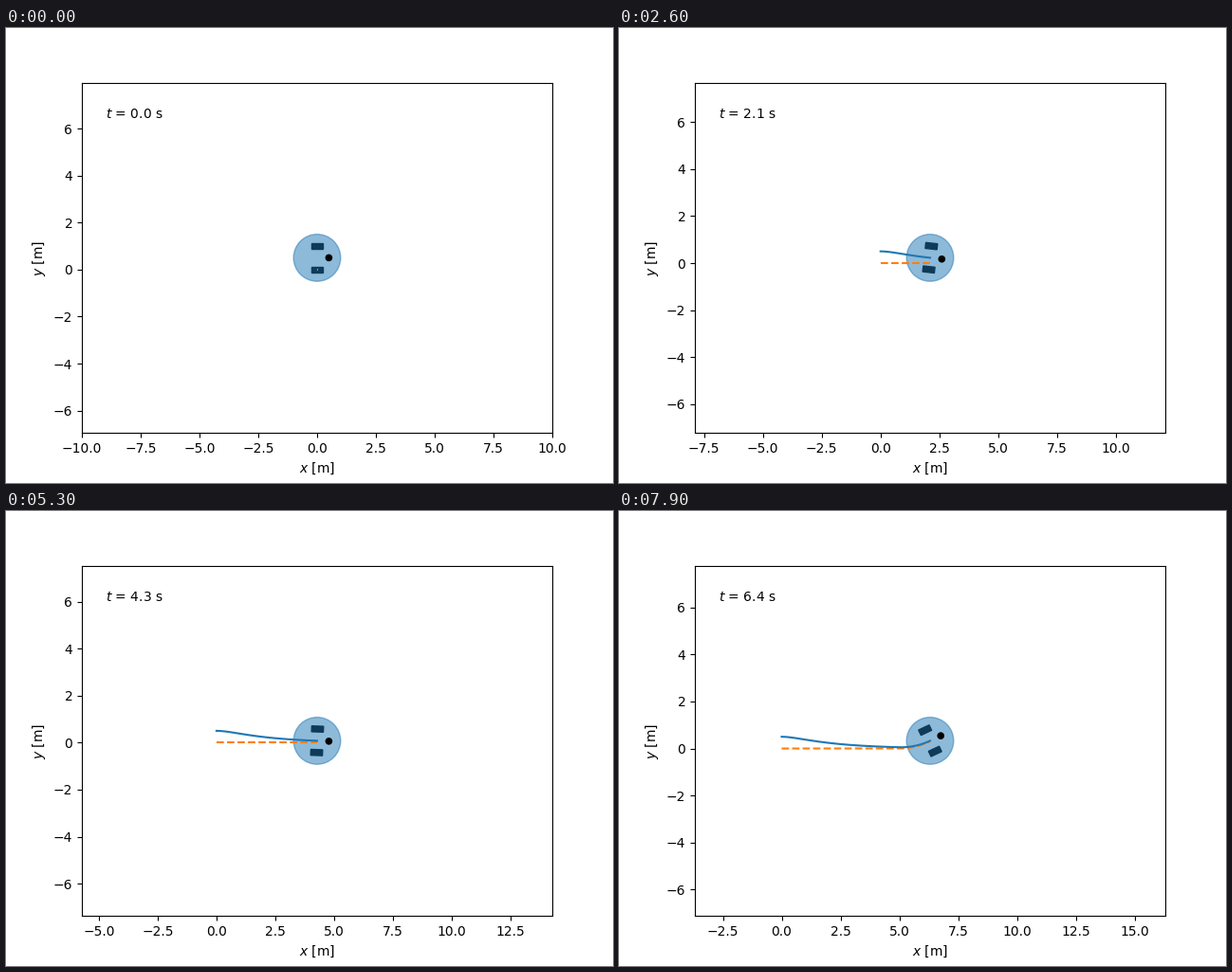
Write a matplotlib script that moves like this. It is 640 by 480 pixels and loops after 8 s.

```python
import numpy as np
import matplotlib.pyplot as plt
from matplotlib.animation import FuncAnimation
from matplotlib.patches import Circle

T = 0.04          # sample period [s]
FRAMES = 80
STEPS = 2 * FRAMES
SPEED = 1.0       # m/s
TURN_TIME = 5.0   # start of the turn [s]
RADIUS = 3.0      # turn radius [m]
TRACK = 1.0       # distance between the wheels [m]
HALF_W = 10.0
HALF_H = HALF_W * (480 * 0.77) / (640 * 0.775)


def desired(t):
    """Pose (x, y, heading) on a straight line followed by an arc."""
    straight = SPEED * min(t, TURN_TIME)
    angle = SPEED * max(t - TURN_TIME, 0) / RADIUS
    return np.array([straight + RADIUS * np.sin(angle),
                     RADIUS * (1 - np.cos(angle)), angle])


def control(pose, goal, t):
    """Linear tracking control with poles at -1, -2 and -0.5."""
    dx, dy, dth = pose - goal
    c, s = np.cos(goal[2]), np.sin(goal[2])
    along, across = c * dx + s * dy, c * dy - s * dx
    turn = SPEED / RADIUS if t >= TURN_TIME else 0.0
    return SPEED - along, turn - across - 2.5 * dth


def simulate():
    goals = np.array([desired(k * T) for k in range(STEPS)])
    poses = np.zeros((STEPS, 3))
    poses[0] = 0, 0.5, 0
    v = w = 0.0
    for k in range(1, STEPS):
        x, y, th = poses[k - 1]
        mid = th + w * T / 2
        poses[k] = x + v * T * np.cos(mid), y + v * T * np.sin(mid), th + w * T
        v, w = control(poses[k], goals[k], k * T)
    return poses, goals


def wheel_corners(x, y, th, side):
    """Corners of one wheel; side is +1 for left and -1 for right."""
    u = np.array([-1, 1, 1, -1, -1]) * TRACK / 4
    v = np.array([-1, -1, 1, 1, -1]) * TRACK / 8 + side * TRACK / 2
    c, s = np.cos(th), np.sin(th)
    return np.column_stack([x + c * u - s * v, y + s * u + c * v])


poses, goals = simulate()

fig, ax = plt.subplots(figsize=(6.4, 4.8), dpi=100)
ax.set_xlabel(r"$x$ [m]")
ax.set_ylabel(r"$y$ [m]")
plan, = ax.plot([], [], "C1--")
path, = ax.plot([], [], "C0")
wheels = [ax.fill([0, 1, 1], [0, 0, 1], color="k")[0] for _ in range(2)]
body = ax.add_patch(Circle((0, 0), TRACK, color="C0", alpha=0.5))
castor = ax.add_patch(Circle((0, 0), TRACK / 8, color="k"))
clock = ax.text(0.05, 0.9, "", transform=ax.transAxes)


def update(i):
    k = 2 * i + 1
    x, y, th = poses[k]
    plan.set_data(goals[:k + 1, 0], goals[:k + 1, 1])
    path.set_data(poses[:k + 1, 0], poses[:k + 1, 1])
    for wheel, side in zip(wheels, (1, -1)):
        wheel.set_xy(wheel_corners(x, y, th, side))
    body.center = x, y
    castor.center = x + TRACK / 2 * np.cos(th), y + TRACK / 2 * np.sin(th)
    clock.set_text(r"$t$ = %.1f s" % (k * T))
    ax.set_xlim(x - HALF_W, x + HALF_W)
    ax.set_ylim(y - HALF_H, y + HALF_H)
    return [plan, path, *wheels, body, castor, clock]


ani = FuncAnimation(fig, update, frames=FRAMES, interval=100,
                    repeat=True, repeat_delay=0, blit=False)
plt.show()
```
